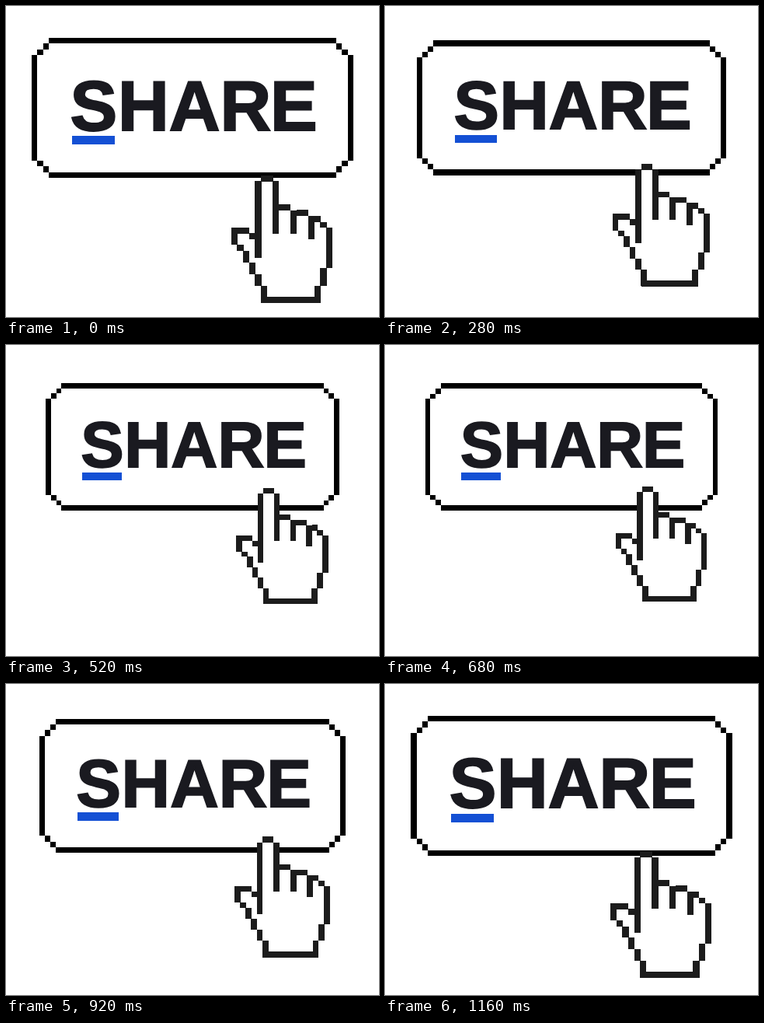
Write an HTML page that moves like this. It is 480 px wide and 400 px high and loops after 1.2 s.

```html
<!DOCTYPE html>
<html lang="en">
<head>
<meta charset="utf-8">
<title>Share button</title>
<style>
  html, body { margin: 0; width: 100%; height: 100%; overflow: hidden; background: #fff; }
  svg { display: block; width: 100vw; height: 100vh; }
  path, rect { shape-rendering: crispEdges; }
  text {
    font: bold 91px "Liberation Sans", Arial, sans-serif;
    fill: #1a1a20;
    stroke: #1a1a20;
    stroke-width: 2;
    text-rendering: geometricPrecision;
  }
</style>
</head>
<body>
<svg viewBox="0 0 480 400">
  <g id="button">
    <path id="frame" fill="none" stroke="#000"/>
    <text x="82.5 143.9 209.7 275.5 340.1" y="159.5">SHARE</text>
    <rect x="84.5" y="167" width="55.5" height="11" fill="#1450d4"/>
  </g>
  <g id="hand">
    <g transform="translate(-70 -164) scale(7.647 7.455)">
      <path d="M5 .5h2v11h-2z" fill="#fff"/>
      <path fill="none" stroke="#1c1c1c" stroke-width="1.08" d="M5 .5h2M4.5 1v13.2M7.5 1v9M8 5.5h2
        M10.5 6v4M11 6.5h2M13.5 7v4M14 7.5h1M15.5 8v1M16.5 9v7M15.5 16v3M14.5 19v3M5 21.5h10
        M5.5 19v3M4.5 17v2M3.5 15v2M2.5 13v2M1.5 12v1M.5 9v3M1 9.5h2M3 10.5h1"/>
    </g>
  </g>
</svg>
<script>
const LOOP = 1200, STEP = 40;
const CX = 240, CY = 131, HALF_W = 207, HALF_H = 90, PIXEL = 7.4;
const button = document.getElementById("button");
const hand = document.getElementById("hand");

// How far each side of the button moves inwards: [ms, px]
const squeeze = [[0, 0], [160, 2.2], [360, 12], [520, 18], [640, 19.2],
                 [840, 14.3], [1000, 5.7], [1160, 0.2], [1200, 0]];

function slope(keys, i) {
  if (i === 0 || i === keys.length - 1) return 0;
  const [t0, v0] = keys[i - 1], [t1, v1] = keys[i + 1];
  return (v1 - v0) / (t1 - t0);
}

// Smooth cubic through the keys
function sample(keys, t) {
  let i = 0;
  while (i < keys.length - 2 && t >= keys[i + 1][0]) i++;
  const [t0, v0] = keys[i], [t1, v1] = keys[i + 1];
  const span = t1 - t0, u = (t - t0) / span, w = 1 - u;
  return v0 * w * w * (1 + 2 * u) + v1 * u * u * (3 - 2 * u)
    + span * u * w * (slope(keys, i) * w - slope(keys, i + 1) * u);
}

// Four straight sides with two stair pixels in each corner
function framePath() {
  const p = PIXEL, x = HALF_W, y = HALF_H;
  let d = "";
  for (const s of [-1, 1]) {
    d += `M${CX - x + 3 * p} ${CY + s * (y - p / 2)}h${2 * x - 6 * p}`;
    d += `M${CX + s * (x - p / 2)} ${CY - y + 3 * p}v${2 * y - 6 * p}`;
    for (const r of [-1, 1])
      for (const n of [1, 2])
        d += `M${CX + s * (x - n * p)} ${CY + r * (y - (3.5 - n) * p)}h${-s * p}`;
  }
  return d;
}

function draw(t) {
  const press = (1 - Math.cos(2 * Math.PI * t / 1270)) / 2;
  const size = 1 - sample(squeeze, t) / HALF_W;
  button.setAttribute("transform",
    `translate(${CX} ${CY}) scale(${size}) translate(${-CX} ${-CY})`);
  hand.setAttribute("transform",
    `translate(360 ${382 - 53 * press}) scale(${1 - 0.1 * press})`);
}

const frame = document.getElementById("frame");
frame.setAttribute("d", framePath());
frame.setAttribute("stroke-width", PIXEL);

function tick() {
  const t = performance.now() % LOOP;
  draw(Math.floor(t / STEP) * STEP);
  requestAnimationFrame(tick);
}
tick();
</script>
</body>
</html>
```
